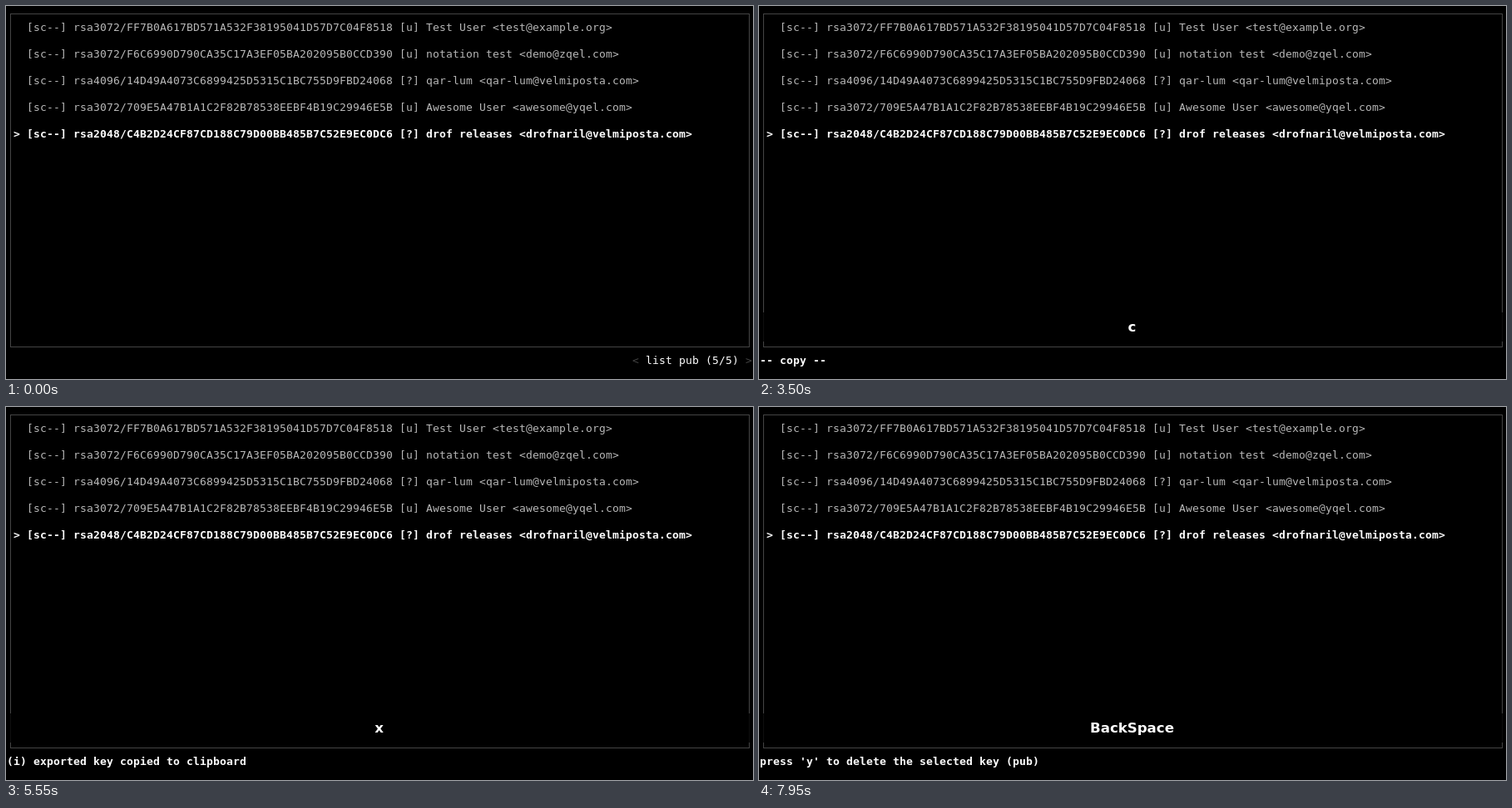
Animation, 898 px wide and 448 px high, one loop 8 s. Source, as an HTML page:

```html
<!DOCTYPE html>
<html lang="en">
<head>
<meta charset="utf-8">
<title>Key list</title>
<style>
  html, body { margin: 0; width: 100%; height: 100%; overflow: hidden; background: #000; }
  svg { display: block; width: 898px; height: 448px; }
  .term { font: 13px "DejaVu Sans Mono", monospace; fill: #b8b8b8; }
  .bold { font-weight: bold; fill: #fff; }
  .lit { fill: #fff; }
  .dim { fill: #444; }
  .key { font: bold 16.6px "DejaVu Sans", sans-serif; fill: #fff; text-anchor: middle; }
</style>
</head>
<body>
<svg id="stage" viewBox="0 0 898 448">
  <rect width="898" height="448" fill="#000"/>
  <rect x="5.5" y="9.5" width="888" height="400" fill="none" stroke="#444" shape-rendering="crispEdges"/>
  <g id="keys"></g>
  <g id="status"></g>
  <g id="caster">
    <rect id="strip" y="368" width="898" height="35" fill="#000"/>
    <text id="cap" class="key" x="448.5" y="391"></text>
    <rect id="line" y="391" height="1" fill="#fff"/>
  </g>
</svg>
<script>
const LOOP = 8000, CELL = 8, ROW = 16, STATUS_ROW = 26;
const $ = id => document.getElementById(id);

// Text on the terminal grid: one cell per character.
function put(parent, col, row, str, cls = "") {
  const el = document.createElementNS("http://www.w3.org/2000/svg", "text");
  el.setAttribute("class", "term " + cls);
  el.setAttribute("x", [...str].map((_, i) => 1 + (col + i) * CELL).join(" "));
  el.setAttribute("y", 14 + row * ROW);
  el.textContent = str;
  parent.appendChild(el);
}

const keys = [
  ["rsa3072/FF7B0A617BD571A532F38195041D57D7C04F8518 [u]", "Test User <test@example.org>"],
  ["rsa3072/F6C6990D790CA35C17A3EF05BA202095B0CCD390 [u]", "notation test <demo@zqel.com>"],
  ["rsa4096/14D49A4073C6899425D5315C1BC755D9FBD24068 [?]", "qar-lum <qar-lum@velmiposta.com>"],
  ["rsa3072/709E5A47B1A1C2F82B78538EEBF4B19C29946E5B [u]", "Awesome User <awesome@yqel.com>"],
  ["rsa2048/C4B2D24CF87CD188C79D00BB485B7C52E9EC0DC6 [?]", "drof releases <drofnaril@velmiposta.com>"]
];
keys.forEach(([id, user], i) => {
  const selected = i === keys.length - 1;
  const cls = selected ? "bold" : "";
  if (selected) put($("keys"), 1, 1 + 2 * i, ">", cls);
  put($("keys"), 3, 1 + 2 * i, `[sc--] ${id} ${user}`, cls);
});

const messages = [
  { from: 1000, to: 3000, text: "(i) armor: true" },
  { from: 3300, to: 5200, text: "-- copy --" },
  { from: 5400, to: 7200, text: "(i) exported key copied to clipboard" },
  { from: 7800, to: LOOP, text: "press 'y' to delete the selected key (pub)" }
];

// Each key press shows for HOLD ms, underlined for the first FRESH ms.
const HOLD = 1700, FRESH = 200;
const presses = [
  { at: 1000, key: "a", x: 443, w: 11, ghost: 0.07 },
  { at: 3300, key: "c", x: 444, w: 10, ghost: 0 },
  { at: 5350, key: "x", x: 443, w: 11, ghost: 0.07 },
  { at: 7750, key: "BackSpace", x: 398, w: 101, ghost: 0 }
];

let shown = null;
function drawStatus(text) {
  if (text === shown) return;
  shown = text;
  const box = $("status");
  box.replaceChildren();
  if (text) return put(box, 0, STATUS_ROW, text, "bold");
  put(box, 94, STATUS_ROW, "<", "dim");
  put(box, 96, STATUS_ROW, "list pub (5/5)", "lit");
  put(box, 111, STATUS_ROW, ">", "dim");
}

function drawCaster(t) {
  const press = presses.filter(p => t >= p.at).pop();
  $("caster").style.display = press ? "" : "none";
  if (!press) return;
  const age = t - press.at, held = age < HOLD;
  $("strip").setAttribute("opacity", held ? 0.8 : 0.06);
  const cap = $("cap");
  if (cap.textContent !== press.key) cap.textContent = press.key;
  cap.setAttribute("opacity", held ? 1 : press.ghost);
  cap.setAttribute("stroke", held ? "none" : "#fff");
  const line = $("line");
  line.setAttribute("x", press.x);
  line.setAttribute("width", press.w);
  line.setAttribute("opacity", age < FRESH ? 1 : 0);
}

function draw(t) {
  const msg = messages.find(m => t >= m.from && t < m.to);
  drawStatus(msg ? msg.text : "");
  drawCaster(t);
}

const start = performance.now();
function tick() {
  draw((performance.now() - start) % LOOP);
  requestAnimationFrame(tick);
}
tick();
</script>
</body>
</html>
```
